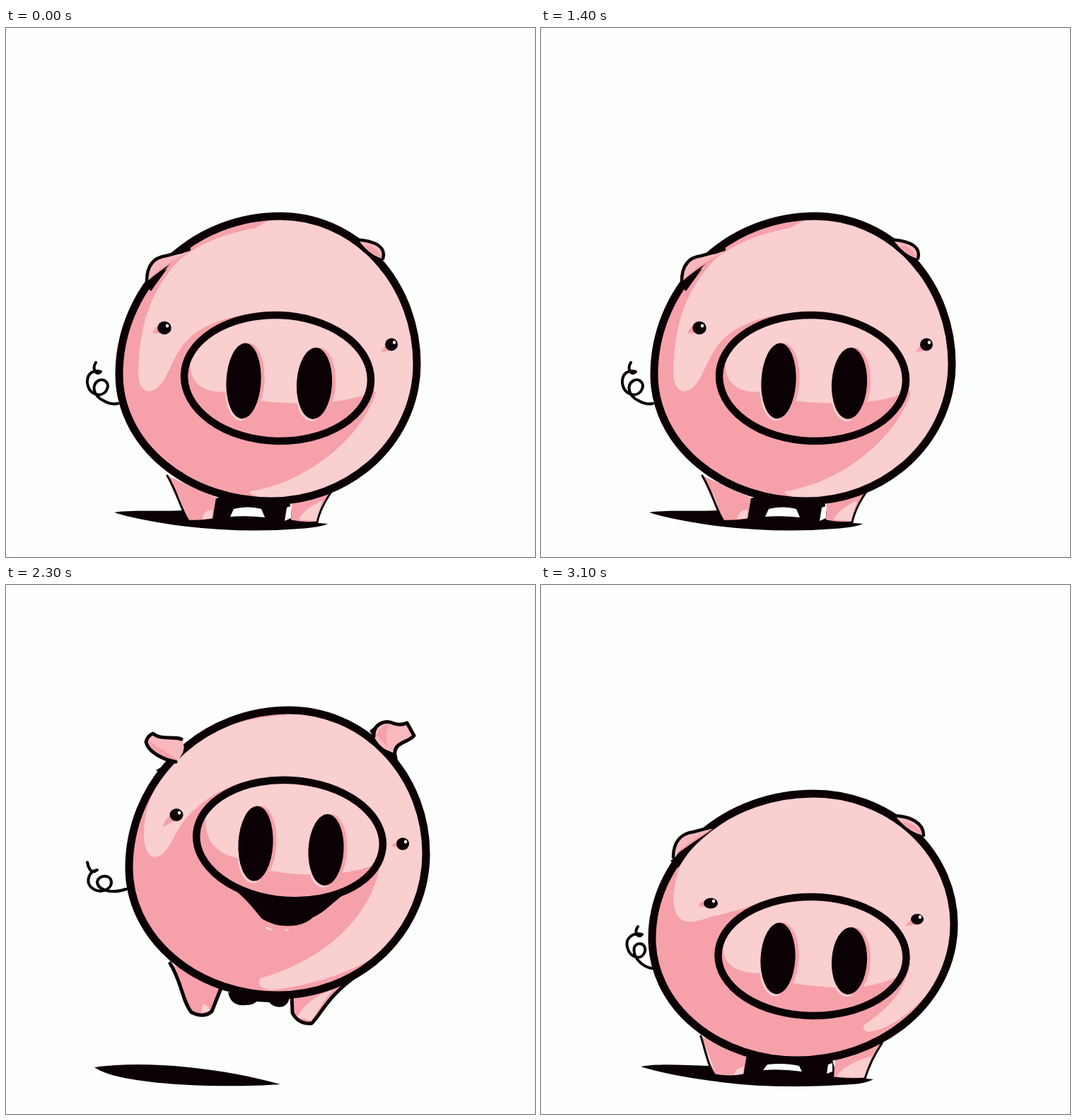
Write an HTML page that moves like this. It is 748x748 px and loops after 3200 ms.

```html
<!DOCTYPE html>
<html lang="en">
<head>
<meta charset="utf-8">
<title>Jumping pig</title>
<style>
  html, body { margin: 0; width: 100%; height: 100%; overflow: hidden; background: #fdfffc; }
  svg { display: block; width: 100vw; height: 100vh; }
  .ink { fill: #0b0004; }
  .mid { fill: #f6a1aa; }
  .light { fill: #facfcf; }
  .soft { fill: #f8b9be; }
  .paper { fill: #fdfffc; }
  .line { fill: none; stroke: #0b0004; stroke-linecap: round; stroke-linejoin: round; }
  .pose { visibility: hidden; }
  .pose.on { visibility: visible; }
  .eye { transform-box: fill-box; transform-origin: 50% 60%; }
</style>
</head>
<body>
<svg id="stage" viewBox="0 0 748 748"></svg>
<script>
// rim: top, right, bottom and left points of the body outline
const stand = {
  rim: [388, 266, 581, 475, 375, 669, 160, 490],
  shadow: 'M153 685C175 681 215 684 250 682L300 664H400L406 697L455 701Q446 706 415 708Q330 715 240 703Q180 694 153 685Z',
  gap: 'M317 691L322 680Q342 675 361 680L366 692Q340 689 317 691ZM397 678L403 676V693L394 697Z',
  legs: ['M228 633C243 658 247 680 258 697Q276 698 292 695L297 664Z',
         'M404 668L403 697Q422 701 440 699Q444 678 464 650Z'],
  legLight: 'M277 694Q281 681 292 681L291 694ZM230 640L245 662L251 680Q238 664 230 640ZM414 695Q420 681 447 668L439 697Z',
  legLine: 'M228 633C243 658 247 680 258 697Q276 698 292 695M403 697Q422 701 440 699Q444 678 464 650',
  legWidth: 3,
  light: 'M187 488C188 430 200 375 245 328C275 303 312 290 352 283L390 262H610V640L480 664H365Q342 660 345 655C430 642 505 575 523 515L380 402C315 402 272 422 253 445C230 472 227 512 201 514Q187 510 187 488Z',
  rimShade: 'M568 386Q582 430 578 480Q577 430 568 386Z',
  snout: [384, 495, 132, 89, 2],
  snoutLight: 'M261 482C263 505 284 517 312 514L330 523Q400 535 465 528Q500 524 522 512V390H250Z',
  nostrils: [[336, 499, 24.5, 53.5], [436, 502.5, 25, 50.5]],
  eyes: [[224, 424, 9.8, 9.2], [545, 447.5, 9, 9]],
  eyeShade: 'M218 418Q207 426 208 432L222 431ZM540 443L530 458L547 456Z',
  ears: ['M200 358C199 336 210 325 227 323L259 317C235 329 219 342 200 358Z',
         'M500 302C520 300 538 311 533 326Q516 323 500 302Z'],
  earShade: 'M202 355Q215 338 257 318L226 338ZM507 308Q520 305 531 324Q516 320 507 308Z',
  earLine: 'M199 358C199 334 211 324 227 322L259 313M490 299C520 300 538 308 533 326',
  earWidth: 4.5,
  fold: 'M195 362Q212 350 228 340L205 372ZM511 317Q528 326 536 341L545 350L532 345Z',
  tail: 'M127 473C121 482 128 493 134 486C125 483 114 487 115 502C117 518 133 523 141 514C149 502 138 494 130 499C121 505 123 520 138 527Q148 533 158 531'
};

const crouch = {
  rim: [385, 295, 584, 480, 362, 672, 157, 500],
  shadow: 'M141 681C165 676 205 679 240 680L295 664H410L418 694L470 699Q458 705 440 706Q330 714 240 701Q180 693 141 681Z',
  gap: 'M314 686L320 678Q345 675 365 680L369 688Q340 684 314 686ZM406 678L412 676V688L404 691Z',
  legs: ['M226 638C234 664 237 682 246 693Q268 697 286 693L291 664Z',
         'M416 668L414 697Q436 700 458 698Q466 672 482 648Z'],
  legLight: 'M228 642Q238 664 246 688Q232 668 228 642ZM272 693Q276 682 287 681L286 692ZM418 695Q425 680 467 666L457 697Z',
  legLine: 'M226 638C234 664 237 682 246 693Q268 697 286 693M414 697Q436 700 458 698Q466 672 482 648',
  legWidth: 3,
  light: 'M187 445C190 400 205 365 250 340L330 285H620V560L545 580Q500 628 462 632Q453 629 457 622C490 600 515 575 522 535L380 438C310 442 290 460 240 469C215 478 190 486 187 445Z',
  rimShade: 'M573 420Q585 455 581 495Q580 450 573 420Z',
  snout: [383.5, 525, 133, 84, 1],
  snoutLight: 'M258 515C258 538 280 549 309 549L330 558Q400 573 455 568Q490 563 522 545V430H250Z',
  nostrils: [[335, 528, 24.5, 50.5], [436, 531.5, 25, 47.5]],
  eyes: [[240, 450, 10, 7.5], [532, 472.5, 9, 7.5]],
  eyeShade: 'M234 446Q222 448 223 454L238 456ZM528 467L515 482L534 480Z',
  ears: ['M188 384C188 363 200 352 216 350L244 344C224 356 205 368 188 384Z',
         'M502 328C524 328 541 337 541 354Q520 350 502 328Z'],
  earShade: 'M191 381Q203 364 242 346L215 364ZM508 334Q527 336 540 352Q522 348 508 334Z',
  earLine: 'M187 385C187 361 200 351 216 349L246 341M498 326C524 327 541 337 541 354',
  earWidth: 4.5,
  fold: 'M183 390Q200 377 217 366L194 400ZM520 346Q535 351 546 365L554 376L540 369Z',
  tail: 'M137 483C131 491 137 501 143 494C130 491 119 499 122 512C126 529 143 531 147 518C149 506 136 504 132 512C129 526 143 540 157 542'
};

const leap = {
  rim: [400, 177, 594, 380, 385, 580, 174, 400],
  shadow: 'M125 682C200 671 310 684 388 706C300 712 160 707 125 682Z',
  gap: '',
  under: 'M314 576Q318 596 338 594Q350 594 354 589L372 590Q380 599 392 596Q401 592 402 578Z',
  legs: ['M232 535C248 560 250 590 262 604Q279 613 291 603L304 568Z',
         'M404 576L405 605Q413 621 432 620C447 606 452 582 502 548Z'],
  legLight: 'M277 606Q276 594 280 592Q287 596 288 602ZM412 611Q424 586 462 572Q446 592 432 616Z',
  legLine: 'M232 535C248 560 250 590 262 604Q279 613 291 603L304 570M404 580L405 605Q413 621 432 620C447 606 452 582 502 548',
  legWidth: 5,
  light: 'M195 352C196 310 212 275 250 236C290 205 330 188 395 184L410 170H620V500L550 507Q480 560 375 573Q352 569 360 556C450 530 520 470 531 385L400 270C320 272 285 300 262 322C235 348 232 384 209 385Q195 380 195 352Z',
  rimShade: 'M572 285Q593 330 591 390Q588 330 572 285Z',
  snout: [401, 361, 132, 85, 4],
  snoutLight: 'M283 340C284 365 300 380 327 386L345 398Q400 412 455 409Q500 406 535 390V270H280Z',
  nostrils: [[353, 365.5, 24.5, 53], [452.5, 374.5, 25, 50.5]],
  eyes: [[241, 325, 9.5, 9], [561, 366, 9, 8.8]],
  eyeShade: 'M236 322Q223 332 222 342L240 333ZM558 361L544 368L557 373Z',
  ears: ['M243 249C222 247 201 236 198 222Q200 213 208 210C219 220 239 213 248 218Q254 228 250 237Z',
         'M520 214C519 196 536 190 549 196Q558 199 568 196L577 213C570 222 551 222 550 236Q532 236 520 214Z'],
  earShade: 'M202 220Q225 235 242 247L232 246Q204 237 202 220ZM524 213Q528 199 543 197Q533 212 541 230Z',
  earLine: 'M240 250C222 247 201 236 198 222Q200 213 208 210C219 220 239 213 248 218M520 214C519 196 536 190 549 196Q558 199 567 195L577 213C570 222 551 222 550 236',
  earWidth: 5,
  fold: 'M212 262Q226 253 242 248L222 268ZM514 206L530 193L522 218ZM530 232L552 238L554 247Z',
  mouth: 'M292 412C330 430 345 452 362 472Q380 483 400 482Q421 482 434 470C452 462 462 448 490 428Z',
  tail: 'M115 392C117 402 121 409 129 403C118 404 113 418 119 426C130 438 149 432 149 420C148 408 130 410 129 420C130 432 150 437 170 430'
};

const peak = { ...leap, lift: [14, -74], shadow: 'M114 682C180 674 280 684 350 703C270 707 145 702 114 682Z' };

const shape = (cls, d, extra = '') => d ? `<path class="${cls}" d="${d}" ${extra}/>` : '';
const line = (d, width) => shape('line', d, `stroke-width="${width}"`);
const ellipse = (cls, x, y, rx, ry, tilt = 0) =>
  `<ellipse class="${cls}" cx="${x}" cy="${y}" rx="${rx}" ry="${ry}" transform="rotate(${tilt} ${x} ${y})"/>`;

function outline([tx, ty, rx, ry, bx, by, lx, ly]) {
  const arc = (w, h, x, y) => `A${w} ${h} 0 0 1 ${x} ${y}`;
  return `M${tx} ${ty}` + arc(rx - tx, ry - ty, rx, ry) + arc(rx - bx, by - ry, bx, by) +
    arc(bx - lx, by - ly, lx, ly) + arc(tx - lx, ly - ty, tx, ty) + 'Z';
}

const nostril = ([x, y, rx, ry]) =>
  ellipse('light', x - 2, y + 3, rx, ry, 3) +
  ellipse('mid', x + 5, y, rx, ry, 3) +
  ellipse('ink', x, y, rx, ry, 3);

const eye = ([x, y, rx, ry]) => `<g class="eye">${ellipse('ink', x, y, rx, ry)}${
  ellipse('paper', x + 4, y - 3, 2.2, 2.6)}</g>`;

function draw(name, p) {
  const body = outline(p.rim);
  const [sx, sy, srx, sry, tilt] = p.snout;
  const [dx, dy] = p.lift || [0, 0];
  return `<g class="pose" id="${name}">
    <clipPath id="${name}-body"><path d="${body}"/></clipPath>
    <clipPath id="${name}-snout">${ellipse('', sx, sy, srx, sry, tilt)}</clipPath>
    ${shape('ink', p.shadow)}${shape('paper', p.gap)}
    <g transform="translate(${dx} ${dy})">
      <g class="tail">${line(p.tail, 4)}</g>
      ${shape('ink', p.under)}
      ${p.legs.map(d => shape('mid', d)).join('')}
      ${shape('light', p.legLight)}${line(p.legLine, p.legWidth)}
      <g clip-path="url(#${name}-body)">
        ${shape('mid', body)}${shape('light', p.light)}${shape('mid', p.rimShade)}
      </g>
      ${line(body, 11)}
      ${shape('ink', p.fold)}
      ${p.ears.map(d => shape('soft', d)).join('')}
      ${shape('mid', p.earShade)}${line(p.earLine, p.earWidth)}
      ${shape('mid', p.eyeShade)}${p.eyes.map(eye).join('')}
      ${shape('ink', p.mouth)}
      ${p.mouth ? ellipse('light', 372, 486, 5, 1.5, 25) + ellipse('light', 397, 488, 3, 1.5) : ''}
      <g clip-path="url(#${name}-snout)">
        ${ellipse('mid', sx, sy, srx, sry, tilt)}${shape('light', p.snoutLight)}
        ${p.nostrils.map(nostril).join('')}
      </g>
      <ellipse class="line" cx="${sx}" cy="${sy}" rx="${srx}" ry="${sry}"
        stroke-width="10.5" transform="rotate(${tilt} ${sx} ${sy})"/>
    </g>
  </g>`;
}

const poses = { stand, crouch, leap, peak };
const stage = document.getElementById('stage');
stage.innerHTML = Object.entries(poses).map(([name, p]) => draw(name, p)).join('');

const STEP = 100, STEPS = 32, IDLE_STEPS = 13;
const jump = ['crouch', 'stand', 'leap', 'peak', 'leap', 'stand'];
const wag = [0, -13, -26, -38, -26, -13];
const lids = [1, 1, 0.55, 0.18, 0.55, 1];
const groups = [...stage.querySelectorAll('.pose')];
const tail = stage.querySelector('#stand .tail');
const eyes = stage.querySelectorAll('#stand .eye');
let shown = -1;

function tick() {
  const step = Math.floor(performance.now() / STEP) % STEPS;
  if (step !== shown) {
    shown = step;
    const idle = step < IDLE_STEPS;
    const pose = idle ? 'stand' : jump[(step - IDLE_STEPS) % 6];
    const beat = idle ? step % 6 : 0;
    groups.forEach(g => g.classList.toggle('on', g.id === pose));
    tail.setAttribute('transform', `rotate(${wag[beat]} 158 531)`);
    eyes.forEach(e => { e.style.transform = `scaleY(${lids[beat]})`; });
  }
  requestAnimationFrame(tick);
}
tick();
</script>
</body>
</html>
```
